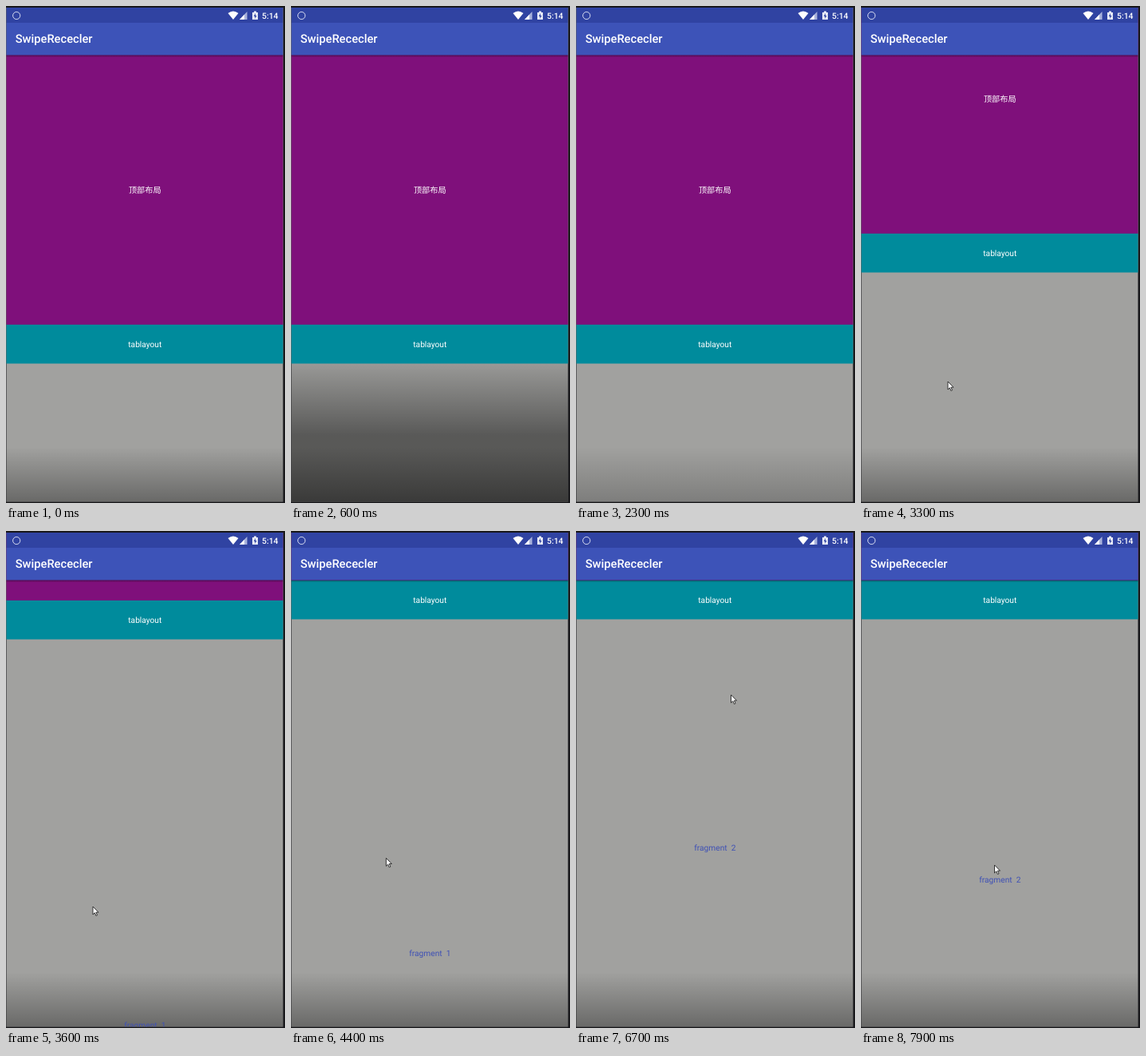
An HTML page for the animation above (8 s loop, 350 px wide and 622 px high).

```html
<!DOCTYPE html>
<html lang="zh">
<head>
<meta charset="utf-8">
<style>
  html, body { margin: 0; width: 100%; height: 100%; overflow: hidden; background: #17171a; }
  svg { display: block; width: 100%; height: 100%; }
  text { font: 10.2px Roboto, "Noto Sans CJK SC", "Noto Sans CJK", sans-serif; fill: #fff; white-space: pre; text-rendering: geometricPrecision; }
  .mid { text-anchor: middle; }
  .page { fill: #3f51b5; }
  .bold { font-weight: 500; }
  .title { font-size: 14.7px; font-weight: 500; }
  .clock { font-size: 10.4px; font-weight: 500; }
</style>
</head>
<body>
<svg viewBox="0 0 350 622">
  <defs>
    <linearGradient id="shade" x1="0" x2="0" y1="0" y2="1">
      <stop offset="0" stop-opacity="0"/>
      <stop offset="1" stop-opacity="1"/>
    </linearGradient>
    <linearGradient id="dusk" x1="0" x2="0" y1="0" y2="1">
      <stop offset="0" stop-opacity="0"/>
      <stop offset=".55" stop-opacity="1"/>
    </linearGradient>
    <linearGradient id="drop" x1="0" x2="0" y1="0" y2="1">
      <stop offset="0" stop-opacity=".35"/>
      <stop offset="1" stop-opacity="0"/>
    </linearGradient>
    <clipPath id="screen"><path d="M.5 2H347.500V620.500H.5z"/></clipPath>
  </defs>
  <rect width="350" height="622" fill="#17171a"/>
  <g clip-path="url(#screen)">
    <rect width="350" height="622" fill="#a1a19f"/>
    <rect id="deepFade" y="436" width="350" height="185" fill="url(#dusk)"/>
    <rect id="edgeFade" y="552" width="350" height="69" fill="url(#shade)"/>
    <text id="page1" class="mid page" y="4">fragment  1</text>
    <text id="page2" class="mid page" y="4">fragment  2</text>
    <g id="header">
      <rect y="61" width="350" height="338" fill="#7f107b"/>
      <text class="mid bold" x="174.3" y="234" lang="zh-CN">顶部布局</text>
      <rect y="398.800" width="350" height="48.700" fill="#008b9c"/>
      <text class="mid" x="174.3" y="427">tablayout</text>
    </g>
    <rect width="350" height="21" fill="#3043a2"/>
    <rect y="21" width="350" height="40.500" fill="#3d53b8"/>
    <rect y="61.500" width="350" height="3" fill="url(#drop)"/>
    <text class="title" x="11.7" y="46.400">SwipeRececler</text>
    <circle cx="13.2" cy="12" r="4.6" fill="none" stroke="#d5daf0"/>
    <path d="M278.500 9Q285 4 291.500 9L285 17z" fill="#fff"/>
    <path d="M293 17L302.500 7V17z" fill="#a9b3dc"/>
    <path d="M293 17L299 10.700V17z" fill="#fff"/>
    <path d="M309 8h2v-1.500h3V8h2v9h-7z" fill="#e8ebf7"/>
    <path d="M313 9l-2.200 4h1.500v3l2.200-4H313z" fill="#3043a2"/>
    <text class="clock" x="321" y="16">5:14</text>
    <path id="cursor" d="M0 0v10l2.300-2.200 1.600 3.700 1.600-.7-1.600-3.600h3.100z" fill="#fff" stroke="#222" stroke-width=".9"/>
  </g>
</svg>
<script>
const LOOP = 8000, STEP = 100, PAGE_WIDTH = 347;
const CENTER = 174.3, PAGE_TEXT_Y = 593;
const PULL = 114, FLING = 223;   // header travel under the finger, then after release

const linear = u => u;
const easeIn = u => u * u;
const easeOut = u => 1 - (1 - u) ** 2;
const settle = u => 1 - (1 - u) ** 3;
const smooth = u => u * u * (3 - 2 * u);

const el = id => document.getElementById(id);
const move = (id, x, y) => el(id).setAttribute("transform", `translate(${x} ${y})`);
const fade = (id, opacity) => el(id).setAttribute("opacity", opacity);

function draw(now) {
  const t = Math.floor(now % LOOP / STEP) * STEP;
  const ramp = (from, to, ease = linear) =>
    ease(Math.min(1, Math.max(0, (t - from) / (to - from))));

  // Bottom shade
  const dark = ramp(300, 600) - ramp(1900, 2300);
  const dip = ramp(1900, 2300) - ramp(2300, 2600);
  fade("deepFade", 0.45 * dark);
  fade("edgeFade", 0.35 * (1 - 0.37 * dip));

  // Header collapses: drag, then fling
  const pull = PULL * ramp(2900, 3300, easeIn);
  const fling = FLING * ramp(3300, 3880, settle);
  const below = PULL + FLING - pull - fling;
  move("header", 0, -pull - fling);

  // First page is dragged up and flung, then swiped away
  const drag1 = ramp(4100, 5000);
  const rest1 = ramp(5000, 5400, easeOut);
  const swipe = ramp(5650, 6100, smooth);
  move("page1", CENTER - PAGE_WIDTH * swipe, PAGE_TEXT_Y + below - 195 * drag1 - 125 * rest1);

  // Second page goes up, back down, and up a little
  const up = ramp(6100, 6400);
  const coast = ramp(6400, 6900, easeOut);
  const down = ramp(6900, 7400);
  const back = ramp(7700, 7900);
  move("page2", CENTER + PAGE_WIDTH * (1 - swipe),
    PAGE_TEXT_Y + below - 138 * up - 70 * coast + 85 * down - 34 * back);

  // Pointer follows each gesture
  const aim = ramp(5500, 5700);
  const x = 109 + 31 * drag1 + 14.5 * rest1 + 75 * aim - 80 * ramp(5700, 6000)
    + 54 * up - 36 * ramp(6400, 7600);
  const y = 470 + PULL - pull - 182 * drag1 + 34 * rest1 + 18 * aim
    - 135 * up + 92 * down + 155 * ramp(7400, 7700) - 34 * back;
  move("cursor", x, y);
  el("cursor").setAttribute("visibility", t < 2700 ? "hidden" : "visible");
}

const start = performance.now();
function loop() {
  draw(performance.now() - start);
  requestAnimationFrame(loop);
}
loop();
</script>
</body>
</html>
```
